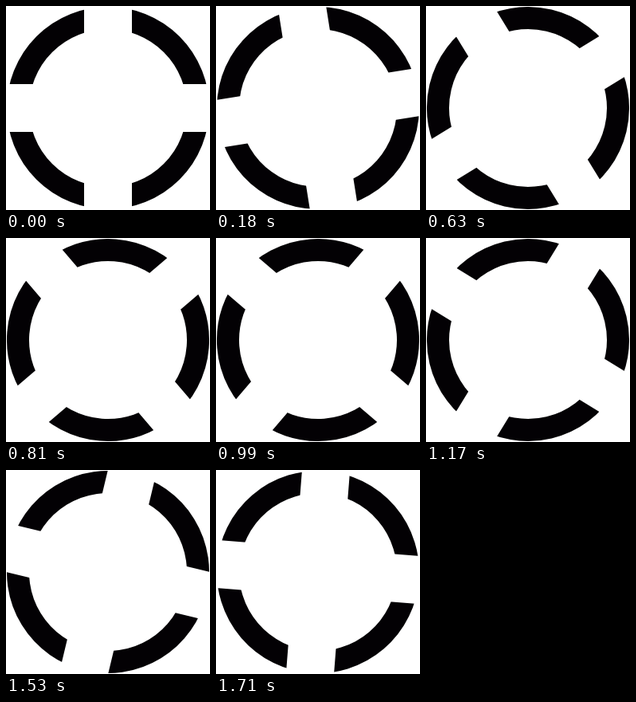
These frames come from a looping animation (256 by 256 pixels, 1.8 s). An HTML page:

```html
<!DOCTYPE html>
<html lang="en">
<head>
<meta charset="utf-8">
<title>Rotating ring</title>
<style>
  html, body { margin: 0; width: 100%; height: 100%; overflow: hidden; background: #fff; }
  svg { display: block; width: 100%; height: 100%; }
</style>
</head>
<body>
<svg viewBox="0 0 256 256">
  <g id="ring" fill="none">
    <circle cx="128" cy="128" r="113" stroke="#030104" stroke-width="28"/>
    <!-- The white cross cuts the ring into four arcs with parallel gaps. -->
    <path d="M128 -10V266M-10 128H266" stroke="#fff" stroke-width="60"/>
  </g>
</svg>
<script>
  const STEP_MS = 90;
  const STEPS = 20;
  const QUARTER_TURN = 90;
  const ring = document.getElementById("ring");

  function draw() {
    const step = Math.floor(performance.now() / STEP_MS) % STEPS;
    const angle = -step * QUARTER_TURN / STEPS;
    ring.setAttribute("transform", `rotate(${angle} 128 128)`);
    requestAnimationFrame(draw);
  }
  draw();
</script>
</body>
</html>
```
